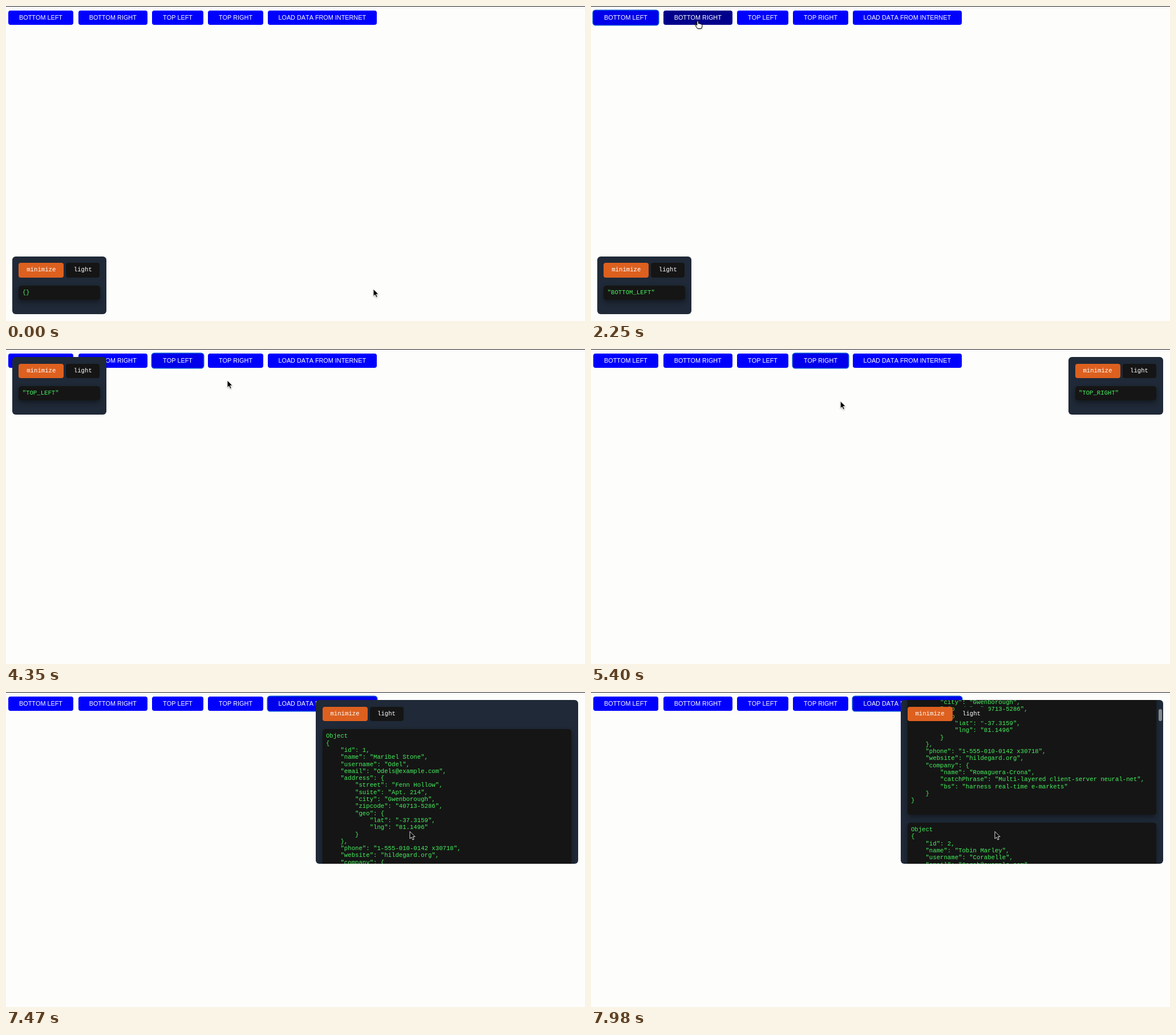
Write an HTML page that moves like this. It is 1015 by 552 pixels and loops after 8 s.

```html
<!DOCTYPE html>
<html lang="en">
<head>
<meta charset="utf-8">
<title>Debug panel</title>
<style>
  html, body { margin: 0; width: 100%; height: 100%; overflow: hidden; }
  body { position: relative; background: #fdfdfc; }
  body * { position: absolute; box-sizing: border-box; }
  #edge { left: 0; top: 0; width: 100%; height: 1px; background: #1c1c26; }
  .nav {
    top: 7.5px; height: 25.5px; border-radius: 4px; background: #00f; color: #fff;
    font: 10.85px/25px "Liberation Sans", Arial, sans-serif; font-kerning: none;
    text-align: center; white-space: nowrap;
  }
  .nav.focus { background: #0000ea; box-shadow: 0 0 0 1.5px #0a55d8; }
  .nav.hover { background: #00008b; }
  #panel {
    overflow: hidden; border-radius: 6px; background: #1f2937;
    font: 10.67px/12.3px "Liberation Mono", "Courier New", monospace;
  }
  .tool {
    top: 11.5px; height: 25.5px; border-radius: 4px; color: #fff;
    line-height: 25.5px; text-align: center;
  }
  #min { left: 11.5px; width: 79px; background: #dd601f; }
  #light { left: 94.5px; width: 59px; background: #151515; }
  #list { left: 11.5px; right: 11.5px; top: 51px; }
  pre {
    position: relative; margin: 0 0 13.5px; padding: 6.4px; border-radius: 5px;
    background: #151515; color: #46f05e; font: inherit;
    box-shadow: 0 4px 8px rgba(0, 0, 0, .4);
  }
  #thumb { right: 1.5px; width: 6px; height: 21px; border-radius: 3px; background: #85888c; }
  #cursor { width: 20px; height: 22px; overflow: visible; filter: drop-shadow(0 1px 1px rgba(0, 0, 0, .3)); }
</style>
</head>
<body>
<div id="edge"></div>
<div id="panel">
  <div id="list"></div>
  <div id="min" class="tool">minimize</div>
  <div id="light" class="tool">light</div>
  <div id="thumb"></div>
</div>
<svg id="cursor">
  <path id="arrow" d="M0 0V12.6L2.9 9.9 5 14.6 7.2 13.6 5.1 9.1H9.1Z" fill="#000" stroke="#fff" stroke-width=".9"/>
  <path id="hand" d="M-1.2 1Q0-1 1.2 1V5Q3 4 3.6 5.4 5.2 4.6 5.7 6 7.5 5.6 7.8 7.3V10L6.5 13.5H0L-3.8 8.4Q-4-6.8-2.8 6.8L-1.2 8Z" fill="#fff" stroke="#000" stroke-width="1"/>
</svg>
<script>
const LOOP = 8000, LOADED = 7050, SCROLL_START = 7490, SCROLL_END = 7980;
const $ = id => document.getElementById(id);

// label, left, width
const navs = [
  ["BOTTOM LEFT", 4, 114], ["BOTTOM RIGHT", 126.5, 121.5], ["TOP LEFT", 256, 90],
  ["TOP RIGHT", 354, 97], ["LOAD DATA FROM INTERNET", 459, 190.5]
].map(([label, x, w]) => {
  const el = document.createElement("div");
  el.className = "nav";
  el.textContent = label;
  el.style.left = x + "px";
  el.style.width = w + "px";
  document.body.insertBefore(el, $("panel"));
  return { el, x, w, value: label.replace(" ", "_") };
});

const clicks = [1400, 2340, 3450, 4900, 6850];

// time, x, y of the pointer tip
const path = [
  [0, 644, 496], [330, 644, 496], [1250, 62, 20], [1550, 64, 21], [1950, 187, 26],
  [2700, 187, 26], [3270, 323, 17], [3660, 323, 17], [4080, 372, 72], [4350, 388, 55],
  [4700, 402, 21], [5150, 402, 21], [5640, 470, 157], [5760, 475, 157], [6510, 556, 31],
  [6600, 556, 22], [7050, 560, 22], [7350, 708, 244.5], [LOOP, 708, 244.5]
];

const users = [
  {
    id: 1, name: "Maribel Stone", username: "Odel", email: "Odels@example.com",
    address: {
      street: "Fenn Hollow", suite: "Apt. 214", city: "Gwenborough", zipcode: "40713-5286",
      geo: { lat: "-37.3159", lng: "81.1496" }
    },
    phone: "1-555-010-0142 x30718", website: "hildegard.org",
    company: {
      name: "Romaguera-Crona", catchPhrase: "Multi-layered client-server neural-net",
      bs: "harness real-time e-markets"
    }
  },
  { id: 2, name: "Tobin Marley", username: "Corabelle", email: "Corab@example.com" }
];
const records = users.map(u => "Object\n" + JSON.stringify(u, null, 4) + "\n\n");

let shown = "";
function fill(texts) {
  const key = texts.join();
  if (key === shown) return;
  shown = key;
  $("list").replaceChildren(...texts.map(text => {
    const pre = document.createElement("pre");
    pre.textContent = text;
    return pre;
  }));
}

function place(el, x, y, w, h) {
  Object.assign(el.style, { left: x + "px", top: y + "px", width: w + "px", height: h + "px" });
}

function pointer(t) {
  const i = path.findIndex(p => p[0] > t), a = path[i - 1], b = path[i];
  const u = (t - a[0]) / (b[0] - a[0]), e = u * u * (3 - 2 * u);
  return [a[1] + (b[1] - a[1]) * e, a[2] + (b[2] - a[2]) * e];
}

function draw(t) {
  const focus = clicks.filter(c => c <= t).length - 1;
  const loaded = t >= LOADED;
  const side = Math.min(focus, 3);
  const right = side === 1 || side === 3, top = side > 1;

  if (loaded) place($("panel"), 543, 14, 459.5, 286.5);
  else place($("panel"), right ? 837 : 10.8, top ? 14 : 438.8, 165.6, 101);
  fill(loaded ? records : [side < 0 ? "{}" : `"${navs[side].value}"`]);

  const u = Math.max(0, Math.min(1, (t - SCROLL_START) / (SCROLL_END - SCROLL_START)));
  const scroll = 170 * u ** 1.4;
  $("list").style.top = 51 - scroll + "px";
  $("thumb").style.top = 2 + scroll * .082 + "px";
  $("thumb").style.display = scroll ? "" : "none";

  const [x, y] = pointer(t);
  let over = false;
  navs.forEach((n, i) => {
    const hover = !loaded && y > 7 && y < 30 && x > n.x && x < n.x + n.w;
    over ||= hover;
    n.el.classList.toggle("hover", hover);
    n.el.classList.toggle("focus", i === focus);
  });
  $("cursor").style.transform = `translate(${x}px, ${y}px)`;
  $("cursor").style.left = $("cursor").style.top = 0;
  $("arrow").style.display = over ? "none" : "";
  $("hand").style.display = over ? "" : "none";
}

function tick() {
  draw(performance.now() % LOOP);
  requestAnimationFrame(tick);
}
tick();
</script>
</body>
</html>
```
